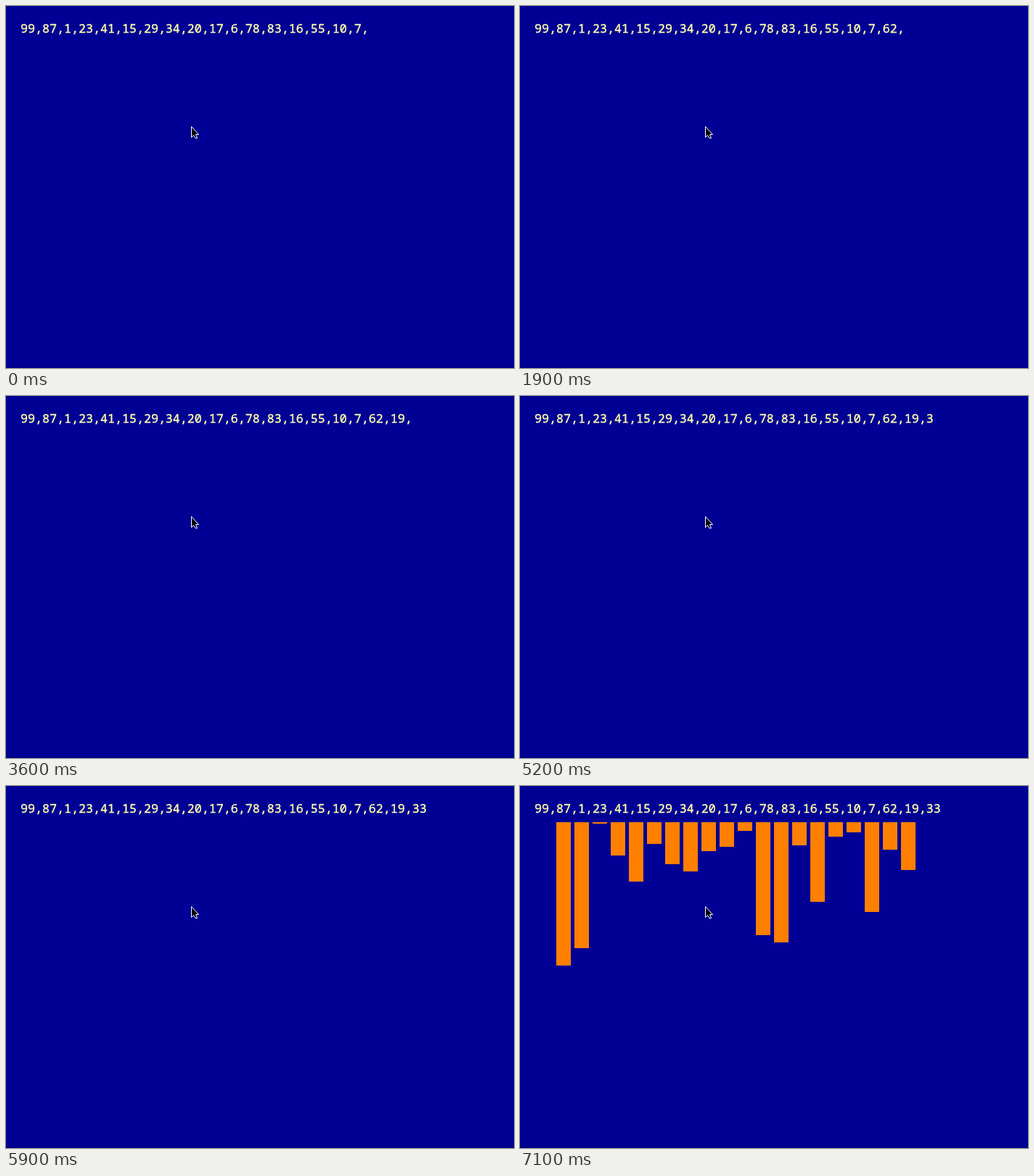
These frames come from a looping animation (700 by 500 pixels, 8 s). An HTML page:

```html
<!DOCTYPE html>
<html lang="en">
<head>
<meta charset="utf-8">
<title>Number bars</title>
<style>
  html, body { margin: 0; width: 100%; height: 100%; overflow: hidden; background: #000094; }
  svg { display: block; width: 700px; height: 500px; }
  text {
    font: 16.667px "Noto Sans Mono", "DejaVu Sans Mono", monospace;
    fill: #ffffaa;
    stroke: #ffffaa;
    stroke-width: .4px;
  }
  #bars { fill: #ff7f00; animation: plot 8s step-end infinite; }
  #cover { fill: #000094; animation: type 8s step-end infinite; }

  /* The cover moves 10px right for each typed character. */
  @keyframes type {
    0% { transform: translateX(0); }
    10% { transform: translateX(10px); }
    18.75% { transform: translateX(20px); }
    23.75% { transform: translateX(30px); }
    35% { transform: translateX(40px); }
    41.25% { transform: translateX(50px); }
    45% { transform: translateX(60px); }
    65% { transform: translateX(70px); }
    68.75%, 100% { transform: translateX(80px); }
  }
  @keyframes plot {
    0% { visibility: hidden; }
    75%, 100% { visibility: visible; }
  }
</style>
</head>
<body>
<svg viewBox="0 0 700 500">
  <rect y="497" width="700" height="3" fill="#00008a"/>
  <text id="list" x="20" y="37">99,87,1,23,41,15,29,34,20,17,6,78,83,16,55,10,7,62,19,33</text>
  <rect id="cover" x="500" y="20" width="110" height="25"/>
  <g id="bars" shape-rendering="crispEdges"></g>
  <path d="M255.5 166.5V181.5L258.5 178.5L261 182.5H263.5L261.5 177.5H265.5Z"
    fill="#000" stroke="#fff" stroke-linejoin="round"/>
</svg>
<script>
  const bars = document.getElementById("bars");
  const values = document.getElementById("list").textContent.split(",").map(Number);

  values.forEach((value, i) => {
    const bar = document.createElementNS("http://www.w3.org/2000/svg", "rect");
    const box = { x: 50 + 25 * i, y: 50, width: 20, height: 2 * value };
    for (const key in box) bar.setAttribute(key, box[key]);
    bars.append(bar);
  });
</script>
</body>
</html>
```
